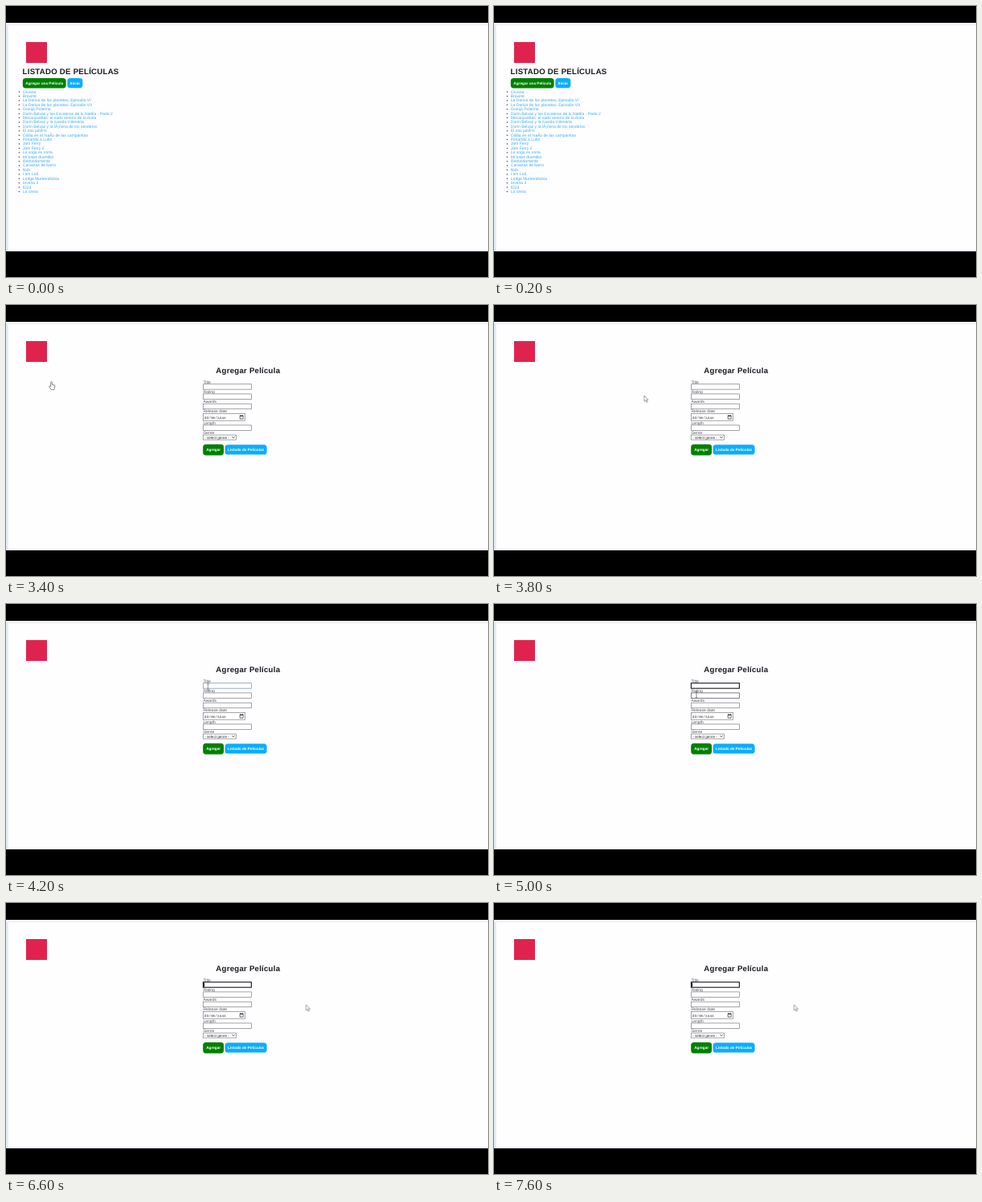
Recreate the animation shown at these times as an HTML page. Size 600x338 px, loop 8 s.

```html
<!DOCTYPE html>
<html lang="es">
<head>
<meta charset="utf-8">
<title>Listado de películas</title>
<style>
  html, body { margin: 0; width: 100%; height: 100%; overflow: hidden; background: #000; }
  svg { display: block; width: 100%; height: 100%; }
  text { font: 5.03px "Liberation Sans", Arial, sans-serif; fill: #55555a; text-rendering: geometricPrecision; }
  .title { font-size: 9.7px; font-weight: bold; letter-spacing: .22px; fill: #1c1c1e; }
  .button text { font-size: 4.72px; font-weight: bold; fill: #fff; text-anchor: middle; }
  .link { fill: #3fadf3; }
  .field { fill: #fff; stroke: #858589; stroke-width: .75; }
  .mono { font: 4.5px "Liberation Mono", monospace; fill: #444; }
  .small { font-size: 4.6px; fill: #333; }
  .pointer { fill: #fff; stroke: #555; stroke-width: .7; stroke-linejoin: round; }
  .beam { fill: none; stroke: #555; stroke-width: .7; }

  .timed { animation: 8s step-end infinite; }
  #list { animation-name: list; }
  #form { animation-name: form; }
  #hand { animation-name: hand; }
  #arrow { animation-name: arrow; stroke: #7a7a7e; }
  #beam { animation-name: beam; }
  #titleBox { animation-name: title-box; }
  #ratingBox { animation-name: rating-box; }
  #caret { animation-name: caret; }

  @keyframes list { 0% { visibility: visible; } 42.5%, 100% { visibility: hidden; } }
  @keyframes form { 0% { visibility: hidden; } 42.5%, 100% { visibility: visible; } }
  @keyframes hand {
    0%, 45%, 100% { visibility: hidden; }
    40% { visibility: visible; }
  }
  @keyframes arrow {
    0% { visibility: hidden; transform: translate(56px, 96px); }
    45% { visibility: visible; transform: translate(56px, 96px); }
    47.5% { visibility: visible; transform: translate(187px, 113px); }
    50% { visibility: hidden; transform: translate(187px, 113px); }
    67.5%, 100% { visibility: visible; transform: translate(373.5px, 126.8px); }
  }
  @keyframes beam {
    0% { visibility: hidden; transform: translate(250px, 107.5px); }
    50% { visibility: visible; transform: translate(250px, 107.5px); }
    52.5% { visibility: visible; transform: translate(251.4px, 99.5px); }
    62.5% { visibility: visible; transform: translate(252px, 109.5px); }
    65% { visibility: visible; transform: translate(303px, 109.5px); }
    67.5%, 100% { visibility: hidden; transform: translate(303px, 109.5px); }
  }
  @keyframes title-box {
    0% { stroke: #858589; stroke-width: .75; }
    52.5% { stroke: #7895b0; stroke-width: .75; }
    55%, 100% { stroke: #181818; stroke-width: 1.1; }
  }
  @keyframes rating-box {
    0%, 67.5%, 100% { stroke: #858589; }
    62.5% { stroke: #55555a; }
  }
  @keyframes caret {
    0%, 62.5%, 75%, 87.5% { opacity: 0; }
    55%, 67.5%, 82.5%, 95%, 100% { opacity: 1; }
  }
</style>
</head>
<body>
<svg viewBox="0 0 600 338" preserveAspectRatio="none">
  <rect width="600" height="338"/>
  <rect y="21" width="600" height="285" fill="#fefdff"/>
  <rect y="23" width="600" height="1" fill="#eceef2"/>
  <rect y="24" width="2.6" height="282" fill="#e0eaf5"/>
  <rect x="25" y="45" width="26" height="26" fill="#e0234e"/>

  <g id="list" class="timed">
    <text class="title" x="20.6" y="85">LISTADO DE PELÍCULAS</text>
    <g id="films"></g>
  </g>

  <g id="form" class="timed">
    <text class="title" x="261.3" y="85">Agregar Película</text>
    <g id="fields"></g>
    <rect id="caret" class="timed" x="246" y="99.4" width="1" height="5.2"/>
    <text class="mono" x="246.8" y="141.6">dd/mm/aaaa</text>
    <path d="M291.2 138.2h4v3.9h-4z" fill="none" stroke="#333" stroke-width=".7"/>
    <path d="M291 138.4h4.4M292 137.2v1M294.4 137.2v1" stroke="#333" stroke-width=".9"/>
    <text class="small" x="247.2" y="166.7">- select genre -</text>
    <path d="M281.3 164.2l1.7 1.7 1.7-1.7" fill="none" stroke="#333" stroke-width=".8"/>
  </g>

  <path id="hand" class="timed pointer" d="M55.7 101.5v-5c0-1.2 1.6-1.2 1.6 0v2.7l2.8.6c.8.2 1 .7.9 1.4l-.6 2.6-.7 1.9h-3.3l-2.5-3.4c-.6-1 .4-1.6 1.1-1.1z"/>
  <path id="arrow" class="timed pointer" d="M0 0v7.2l1.6-1.5 1.2 2.7 1.2-.6-1.2-2.5h2.2z"/>
  <path id="beam" class="timed beam" d="M-1.4 0h2.8M0 0v7.5M-1.4 7.5h2.8"/>
</svg>
<script>
  const films = [
    "Orvena", "Bravine",
    "La Deriva de los planetas: Episodio VI",
    "La Deriva de los planetas: Episodio VII",
    "Granja Polarina",
    "Dorin Belvaz y las Escaleras de la Niebla - Parte 2",
    "Mecanoveltas: el vado sereno de la duna",
    "Dorin Belvaz y la cuerda milenaria",
    "Dorin Belvaz y la lÃ¡mina de los senderos",
    "El oso jabÃ³n", "Odilia en el maÃz de las campanitas",
    "Pintando a Lubo", "Jam Ferry", "Jam Ferry 2",
    "La soga es corta", "Mi torpe duendito", "Redondamente",
    "Canastas de barro", "Nub", "I am Lod", "Lodge Murkendolvia",
    "orvena 3", "fD24", "La cesta"
  ];
  // label, label baseline, box top, box width, box height, id
  const fields = [
    ["Title", 97.5, 98.7, 60, 6.5, "titleBox"],
    ["Rating", 109.7, 110.9, 60, 6.5, "ratingBox"],
    ["Awards", 121.9, 123.2, 60, 6.5],
    ["Release date", 134, 135.6, 52.2, 8.6],
    ["Length", 148.6, 149.9, 60, 6.5],
    ["Genre", 160.7, 162.1, 41.2, 6]
  ];
  const find = id => document.getElementById(id);

  function add(parent, tag, attrs, content = "") {
    const node = document.createElementNS("http://www.w3.org/2000/svg", tag);
    for (const key in attrs) node.setAttribute(key, attrs[key]);
    node.textContent = content;
    return parent.appendChild(node);
  }

  function addButton(parent, label, x, y, width, height, fill) {
    const group = add(parent, "g", { class: "button" });
    add(group, "rect", { x, y, width, height, rx: 3.6, fill });
    add(group, "text", { x: x + width / 2, y: y + height / 2 + 1.7 }, label);
  }

  films.forEach((name, i) => {
    const y = 108.5 + i * 5.41;
    add(find("films"), "circle", { cx: 16.4, cy: y - 1.4, r: .75, fill: "#444" });
    add(find("films"), "text", { class: "link", x: 20.8, y }, name);
  });

  for (const [label, baseline, y, width, height, id] of fields) {
    add(find("fields"), "text", { x: 245.4, y: baseline }, label);
    const box = add(find("fields"), "rect", { class: "field", x: 245.4, y, width, height });
    if (id) {
      box.id = id;
      box.classList.add("timed");
    }
  }

  addButton(find("list"), "Agregar una Película", 20.8, 90, 53.9, 12.4, "#008000");
  addButton(find("list"), "Inicio", 76.3, 90, 19.1, 12.2, "#0aaefc");
  addButton(find("form"), "Agregar", 245.2, 173.8, 25.9, 13.6, "#008000");
  addButton(find("form"), "Listado de Películas", 272.6, 174.3, 52, 12.2, "#0aaefc");
</script>
</body>
</html>
```
